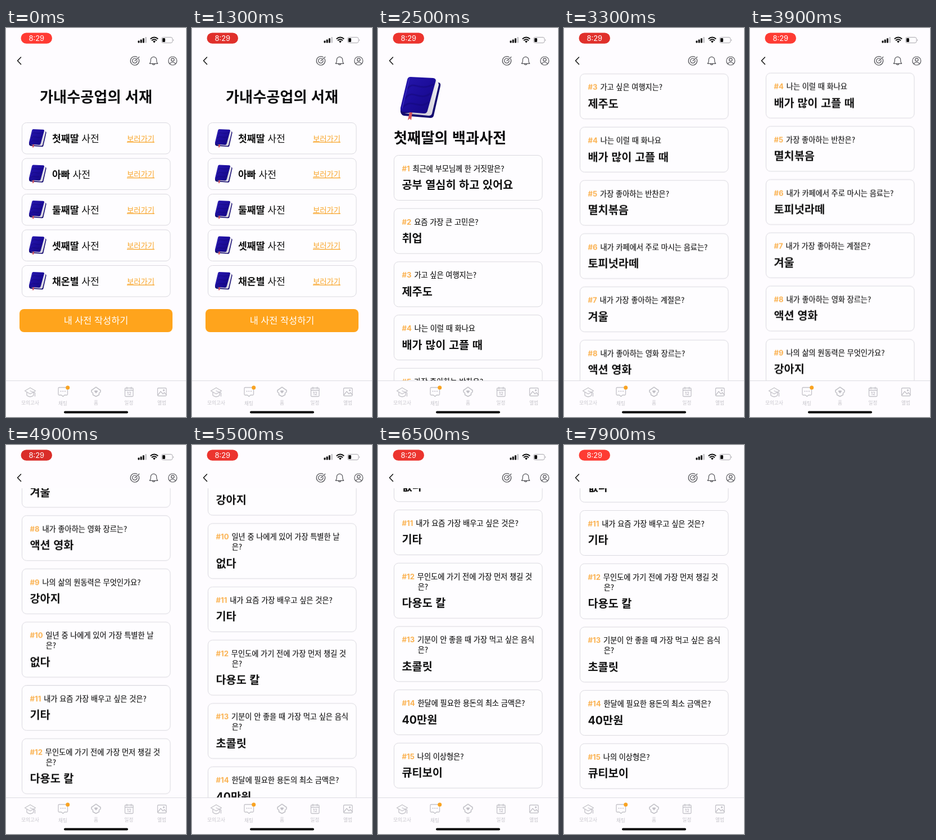
Recreate the animation shown at these times as an HTML page. Size 320 px wide and 692 px high, loop 8000 ms.

```html
<!DOCTYPE html>
<html lang="ko">
<head>
<meta charset="utf-8">
<title>백과사전</title>
<style>
html, body { margin: 0; width: 100%; height: 100%; overflow: hidden; background: #fefcff; }
svg { display: block; }
#stage { width: 320px; height: 692px; }
text { font-family: "Noto Sans CJK KR", "Noto Sans KR", "Noto Sans CJK", sans-serif; fill: #111; white-space: pre; }
.latin { font-family: Inter, Roboto, sans-serif; }
.card { fill: #fefdff; stroke: #dad9df; stroke-width: 1; }
.title { font-size: 26.2px; font-weight: 700; fill: #0c0c0e; }
.owner { font-size: 17.2px; }
.owner tspan { font-weight: 700; }
.link { font-size: 13.3px; fill: #f9a62b; text-decoration: underline; }
.question { font-size: 13.2px; stroke: #111; stroke-width: .15px; }
.number { font-weight: 700; fill: #fbb353; stroke: none; }
.answer { font-size: 19.7px; font-weight: 700; }
.tab { font-size: 8.6px; fill: #c6c5cb; text-anchor: middle; }
.line { fill: none; stroke: #55555a; stroke-width: 1.2; stroke-linecap: round; stroke-linejoin: round; }
.pale { stroke: #c3c2c8; stroke-width: 1.3; }
#pill { fill: #ff3b33; animation: pulse 1s ease-in-out infinite alternate; }
#shelf { animation: leave 8s step-end infinite; }
#book { animation: enter 8s step-end infinite; }
#page { animation: scroll 8s cubic-bezier(.25, .5, .4, 1) infinite; }
@keyframes pulse { to { fill: #d92d29; } }
@keyframes leave { 0% { opacity: 1; } 17.5%, 100% { opacity: 0; } }
@keyframes enter { 0% { opacity: 0; } 17.5%, 100% { opacity: 1; } }
@keyframes scroll {
  0%, 36.25% { transform: translateY(0); }
  47.5%, 50% { transform: translateY(-430.4px); }
  60.6%, 62.5% { transform: translateY(-763.8px); }
  68.1%, 70% { transform: translateY(-939.2px); }
  78.1%, 82% { transform: translateY(-1076.1px); }
  87.5%, 100% { transform: translateY(-1075.1px); }
}
</style>
</head>
<body>
<svg id="stage" viewBox="0 0 320 692">
  <defs>
    <clipPath id="view"><rect y="77" width="320" height="550"/></clipPath>
    <linearGradient id="cover" x2="1" y2="1">
      <stop stop-color="#2718ae"/><stop offset=".5" stop-color="#1c0d9b"/><stop offset="1" stop-color="#150781"/>
    </linearGradient>
    <linearGradient id="paper">
      <stop stop-color="#b9b7c6"/><stop offset=".8" stop-color="#dddbe3"/><stop offset="1" stop-color="#f4f3f6"/>
    </linearGradient>
    <symbol id="volume" viewBox="0 0 73 79" overflow="visible">
      <path fill="#140a70" d="M20 5 69 11Q73 12 72 17L60 70Q59 74 54 74L7 70Q0 68 1 59Z"/>
      <path fill="url(#paper)" d="M60 3Q69 9 69 15L57 66Q56 70 51 70L8 66 42 61Z"/>
      <path fill="#d6545b" d="M17 64 14 78 17.500 75 20 78 22 64Z"/>
      <path fill="url(#cover)" d="M19 1 59 3Q65 4 63.500 9L49 61Q48 66 43 66L6 63Q0 62 1 56L13 6Q14 1 19 1Z"/>
      <path fill="none" stroke="#130775" stroke-width="3" opacity=".45" d="M13 22C26 6 32 28 60 14M9 40C22 20 34 46 55 30M5 55C22 38 32 60 51 46"/>
      <path fill="none" stroke="#3a2dc4" stroke-width="1.200" d="M17 3 4 57"/>
    </symbol>
  </defs>

  <rect width="320" height="692" fill="#fefcff"/>

  <g id="shelf">
    <text class="title" x="160" y="132" text-anchor="middle">가내수공업의 서재</text>
    <g id="rows"></g>
    <rect x="24" y="500" width="272" height="41" rx="8" fill="#ffa41c"/>
    <text x="160" y="526" text-anchor="middle" font-size="16.4" font-weight="500" style="fill:#fff">내 사전 작성하기</text>
  </g>

  <g id="book" clip-path="url(#view)">
    <g id="page">
      <use href="#volume" x="39" y="86" width="73" height="79"/>
      <text class="title" x="28" y="204.8">첫째딸의 백과사전</text>
      <g id="cards"></g>
    </g>
  </g>

  <!-- status bar -->
  <rect id="pill" x="26.500" y="8.500" width="55.500" height="19.200" rx="9.600"/>
  <text class="latin" x="54.300" y="22.800" text-anchor="middle" font-size="13" style="fill:#fff">8:29</text>
  <g fill="#111">
    <rect x="234.500" y="22.500" width="3" height="4" rx=".8"/>
    <rect x="238.700" y="20.500" width="3" height="6" rx=".8"/>
    <rect x="242.900" y="18.300" width="3" height="8.200" rx=".8"/>
    <rect x="247.100" y="16" width="3" height="10.500" rx=".8" fill="#c8c7cb"/>
    <path d="M263.500 26.500 261 23.800Q263.500 21.800 266 23.800Z"/>
    <g fill="none" stroke="#111" stroke-width="1.900">
      <path d="M259 22.200Q263.500 18.500 268 22.200"/>
      <path d="M256.700 19.500Q263.500 13.700 270.300 19.500"/>
    </g>
    <rect x="276.500" y="16.500" width="19.500" height="10" rx="3" fill="none" stroke="#a9a8ad"/>
    <rect x="278" y="18" width="5" height="7" rx="1.300"/>
    <path d="M297.300 19.700Q299.500 21.500 297.300 23.300Z" fill="#a9a8ad"/>
  </g>

  <!-- header -->
  <path class="line" style="stroke:#111;stroke-width:1.500" d="M26.500 52 20.500 58.300 26.500 64.600"/>
  <g class="line">
    <path d="M233 51.800A7.700 7.700 0 1 0 235.800 54.800"/>
    <path d="M231 54.600A4.200 4.200 0 1 0 233 57.500M229 58.500 236.800 51.500"/>
    <path d="M255.300 63.300Q257.300 61.500 257.300 56.500A5.200 5.200 0 0 1 267.700 56.500Q267.700 61.500 269.700 63.300ZM260.500 63.500A2 2 0 0 0 264.500 63.500"/>
    <circle cx="296.300" cy="58.500" r="7.500"/>
    <circle cx="296.300" cy="56.500" r="2.700"/>
    <path d="M291.300 63.800Q292.500 61 296.300 61T301.300 63.800"/>
  </g>

  <!-- tab bar -->
  <path stroke="#dddce2" d="M0 627.500H320"/>
  <g class="line pale">
    <path d="M33.500 645.500 43 640 52.500 645.500 43 651ZM37 648V653.500Q43 658.500 49 653.500V648M43 645.500 51.500 649V655"/>
    <path d="M94.500 639.500H108Q109.500 639.500 109.500 641V651.500Q109.500 653 108 653H104L101.300 655.500 98.500 653H94.500Q93 653 93 651.500V641Q93 639.500 94.500 639.500Z"/>
    <path d="M97.500 646.300h.1M101.200 646.300h.1M104.900 646.300h.1" style="stroke-width:2"/>
    <path d="M160 638.800 168 644.500V647.500L165.500 649.500V652.500L160 655.500 154.500 652.500V649.500L152 647.500V644.500Z" style="stroke-width:1.600"/>
    <rect x="211.500" y="640.500" width="14.500" height="15" rx="1.500"/>
    <path d="M211.500 644.500H226M215 638.800V642M222.500 638.800V642"/>
    <rect x="269.500" y="640.500" width="15.500" height="14" rx="1.500"/>
    <path d="M270 653 275 646.500 279 651 281.500 648.500 285 652.500"/>
    <circle cx="280.500" cy="644.500" r="1"/>
  </g>
  <path fill="#c3c2c8" d="M160 650 157.300 647.200A1.500 1.500 0 0 1 160 645.400 1.500 1.500 0 0 1 162.700 647.200Z"/>
  <text class="latin" x="218.700" y="653" font-size="7.500" font-weight="700" text-anchor="middle" style="fill:#c3c2c8">12</text>
  <circle cx="109.700" cy="639.800" r="3.500" fill="#f9a322"/>
  <g id="tabs"></g>
  <rect x="103" y="681.500" width="114" height="4" rx="2" fill="#050505"/>
</svg>

<script>
const owners = ['첫째딸', '아빠', '둘째딸', '셋째딸', '채온별'];
const entries = [
  ['최근에 부모님께 한 거짓말은?', '공부 열심히 하고 있어요'],
  ['요즘 가장 큰 고민은?', '취업'],
  ['가고 싶은 여행지는?', '제주도'],
  ['나는 이럴 때 화나요', '배가 많이 고플 때'],
  ['가장 좋아하는 반찬은?', '멸치볶음'],
  ['내가 카페에서 주로 마시는 음료는?', '토피넛라떼'],
  ['내가 가장 좋아하는 계절은?', '겨울'],
  ['내가 좋아하는 영화 장르는?', '액션 영화'],
  ['나의 삶의 원동력은 무엇인가요?', '강아지'],
  ['일년 중 나에게 있어 가장 특별한 날|은?', '없다'],
  ['내가 요즘 가장 배우고 싶은 것은?', '기타'],
  ['무인도에 가기 전에 가장 먼저 챙길 것|은?', '다용도 칼'],
  ['기분이 안 좋을 때 가장 먹고 싶은 음식|은?', '초콜릿'],
  ['한달에 필요한 용돈의 최소 금액은?', '40만원'],
  ['나의 이상형은?', '큐티보이']
];
const tabs = [['모의고사', 43], ['채팅', 101], ['홈', 160], ['일정', 218.5], ['앨범', 277]];

const fill = (id, html) => { document.getElementById(id).innerHTML = html; };
const card = (y, h) => `<rect class="card" x="28.5" y="${y + .5}" width="263.5" height="${h - 1}" rx="8"/>`;

fill('rows', owners.map((name, i) => {
  const y = 168 + i * 63.5;
  return card(y, 56.5) +
    `<use href="#volume" x="40.5" y="${y + 11.5}" width="31.500" height="34"/>
    <text class="owner" x="82" y="${y + 35}"><tspan>${name}</tspan> 사전</text>
    <text class="link" x="215" y="${y + 33.5}">보러가기</text>`;
}).join(''));

let cardTop = 226;
fill('cards', entries.map(([question, answer], i) => {
  const y = cardTop;
  const [first, rest] = question.split('|');
  const extra = rest ? 18 : 0;
  cardTop += 94.7 + extra;
  return card(y, 81 + extra) +
    `<text class="question" x="42.5" y="${y + 29}"><tspan class="latin number">#${i + 1}</tspan><tspan dx="4.8">${first}</tspan></text>` +
    (rest ? `<text class="question" x="70.7" y="${y + 47}">${rest}</text>` : '') +
    `<text class="answer" x="42.5" y="${y + 60.4 + extra}">${answer.replace(/\d+/, '<tspan class="latin">$&</tspan>')}</text>`;
}).join(''));

fill('tabs', tabs.map(([label, x]) =>
  `<text class="tab" x="${x}" y="${label === '채팅' ? 671 : 670}">${label}</text>`).join(''));
</script>
</body>
</html>
```
